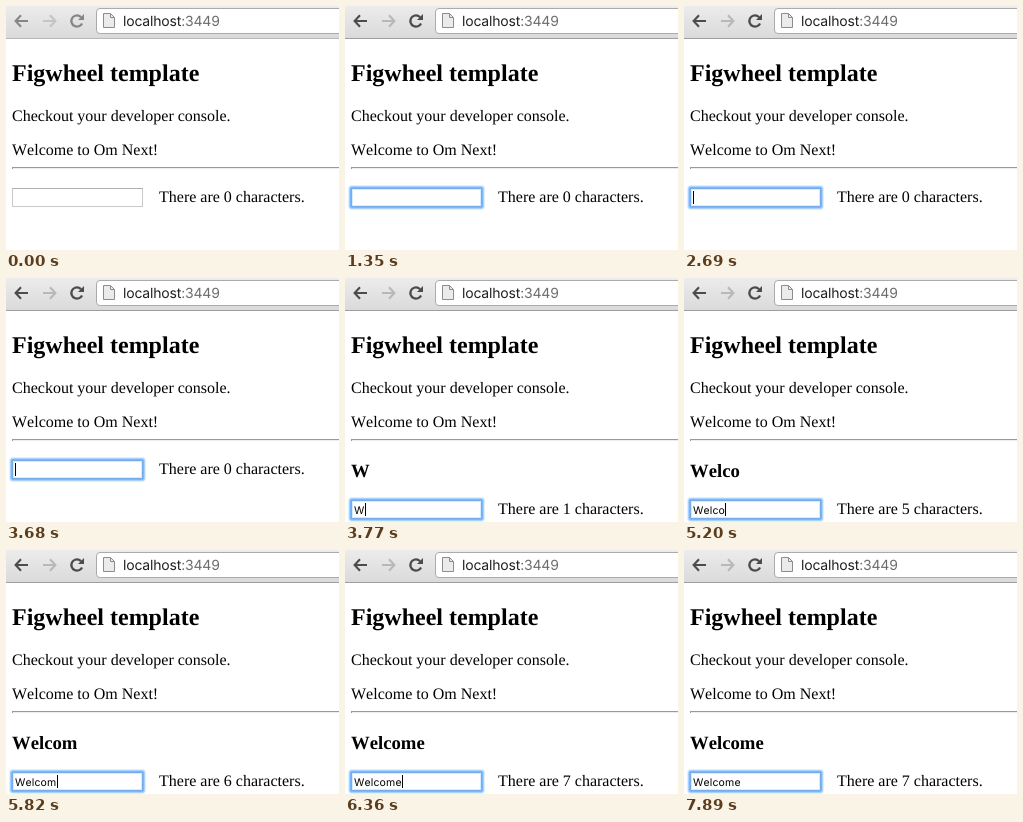
An HTML page with a canvas for the animation above (8000 ms loop, 333 px wide and 244 px high).

```html
<!DOCTYPE html>
<html lang="en">
<head>
<meta charset="utf-8">
<title>Figwheel template</title>
<style>
html, body { margin: 0; width: 100%; height: 100%; overflow: hidden; background: #fff; }
canvas { display: block; width: 333px; height: 244px; }
</style>
</head>
<body>
<canvas id="stage"></canvas>
<script>
const W = 333, H = 244, LOOP = 8000;
const FOCUS = 1350;
const SERIF = '"Liberation Serif", Times, serif';
const SANS = 'Inter, Roboto, sans-serif';
const WORD = 'Welcome';
const TYPED = [3770, 3950, 4660, 4840, 5200, 5820, 6360];
const CARET_X = [9, 20, 26, 29, 35, 41, 51, 57];
// The caret flips at each of these times, starting hidden.
const BLINKS = [1710, 2240, 2690, 3230, 3680, 4480, 4660, 5740, 5820, 6900, 7350, 7890];

const canvas = document.getElementById('stage');
const ctx = canvas.getContext('2d');
const dpr = window.devicePixelRatio || 1;
canvas.width = W * dpr;
canvas.height = H * dpr;
ctx.fontKerning = 'none';
ctx.textRendering = 'geometricPrecision';

const chrome = ctx.createLinearGradient(0, 0, 0, 32);
chrome.addColorStop(0, '#ececec');
chrome.addColorStop(1, '#dadada');

function text(str, x, y, font, color = '#000', spacing = 0) {
  ctx.font = font;
  ctx.letterSpacing = spacing + 'px';
  ctx.fillStyle = color;
  ctx.fillText(str, x, y);
}

function rect(x, y, w, h, color) {
  ctx.fillStyle = color;
  ctx.fillRect(x, y, w, h);
}

function roundRect(x, y, w, h, r, fill, stroke) {
  ctx.beginPath();
  ctx.roundRect(x, y, w, h, r);
  if (fill) { ctx.fillStyle = fill; ctx.fill(); }
  if (stroke) { ctx.lineWidth = 1; ctx.strokeStyle = stroke; ctx.stroke(); }
}

function line(points, color, width) {
  ctx.beginPath();
  points.forEach(([x, y]) => ctx.lineTo(x, y));
  ctx.lineWidth = width;
  ctx.strokeStyle = color;
  ctx.stroke();
}

function arrow(tip, dir, color) {
  line([[tip - dir * 14, 15], [tip - dir * 2, 15]], color, 2);
  line([[tip - dir * 7, 9.3], [tip - dir * 1.6, 15], [tip - dir * 7, 20.7]], color, 2.1);
}

function reload(color) {
  ctx.beginPath();
  ctx.arc(71, 15, 5.6, 0.45, Math.PI * 1.76);
  ctx.lineWidth = 2.3;
  ctx.strokeStyle = color;
  ctx.stroke();
  ctx.beginPath();
  ctx.moveTo(78, 8);
  ctx.lineTo(78, 14);
  ctx.lineTo(72, 14);
  ctx.fillStyle = color;
  ctx.fill();
}

function pageIcon() {
  const grey = '#8c8c8c';
  ctx.beginPath();
  ctx.moveTo(97.5, 7.5);
  ctx.lineTo(104.5, 7.5);
  ctx.lineTo(108.5, 11.5);
  ctx.lineTo(108.5, 21.5);
  ctx.lineTo(97.5, 21.5);
  ctx.closePath();
  ctx.fillStyle = '#ebebeb';
  ctx.fill();
  ctx.lineWidth = 1;
  ctx.strokeStyle = grey;
  ctx.stroke();
  line([[104.5, 7.5], [104.5, 11.5], [108.5, 11.5]], grey, 1);
}

function toolbar(active) {
  const icon = active ? '#4c4c4c' : '#868686';
  rect(0, 0, W, 32, chrome);
  rect(0, 32, W, 1, active ? '#9e9e9e' : '#b8b8b8');
  arrow(8, -1, icon);
  arrow(51, 1, active ? '#b8b8b8' : '#c4c4c4');
  reload(icon);
  roundRect(90.5, 2.5, 260, 25, 3.5, '#fff', '#ababab');
  pageIcon();
  text('localhost', 117, 20, '14px ' + SANS, '#222', -0.17);
  const end = 117 + ctx.measureText('localhost').width;
  text(':3449', end, 20, '14px ' + SANS, '#6c6c6c', -0.17);
}

function input(y, value, focused, caret) {
  if (focused) {
    roundRect(3, y - 3, 137, 25, 4, '#e1f0ff');
    roundRect(4, y - 2, 135, 23, 3, '#a7d1fe');
    roundRect(5, y - 1, 133, 21, 2, '#76b8fd');
    rect(6, y, 131, 19, '#75adec');
    rect(7, y + 1, 129, 17, '#d8ebfe');
    rect(8, y + 2, 127, 15, '#fff');
  } else {
    rect(6, y, 131, 19, '#c9c9c9');
    rect(6, y, 131, 1, '#b0b0b0');
    rect(7, y + 1, 129, 17, '#fff');
  }
  text(value, 9, y + 14, '10.5px ' + SANS, '#000', 0.15);
  if (caret) rect(CARET_X[value.length], y + 3, 1, 13, '#000');
}

function draw(t) {
  const passed = times => times.filter(at => t >= at).length;
  const count = passed(TYPED);
  const value = WORD.slice(0, count);
  const focused = t >= FOCUS;
  const y = count ? 222 : 182;

  ctx.setTransform(dpr, 0, 0, dpr, 0, 0);
  rect(0, 0, W, H, '#fff');
  toolbar(focused);

  text('Figwheel template', 6, 75, 'bold 24px ' + SERIF);
  text('Checkout your developer console.', 6, 115, '16px ' + SERIF);
  text('Welcome to Om Next!', 6, 149, '16px ' + SERIF);
  rect(6, 161, W, 2, '#9a9a9a');
  rect(7, 162, W, 1, '#eee');

  text(value, 6, 199, 'bold 18.72px ' + SERIF);
  input(y, value, focused, passed(BLINKS) % 2 === 1);
  text(`There are ${count} characters.`, 153, y + 14, '16px ' + SERIF);
}

const start = performance.now();
function tick() {
  draw((performance.now() - start) % LOOP);
  requestAnimationFrame(tick);
}
tick();
</script>
</body>
</html>
```
